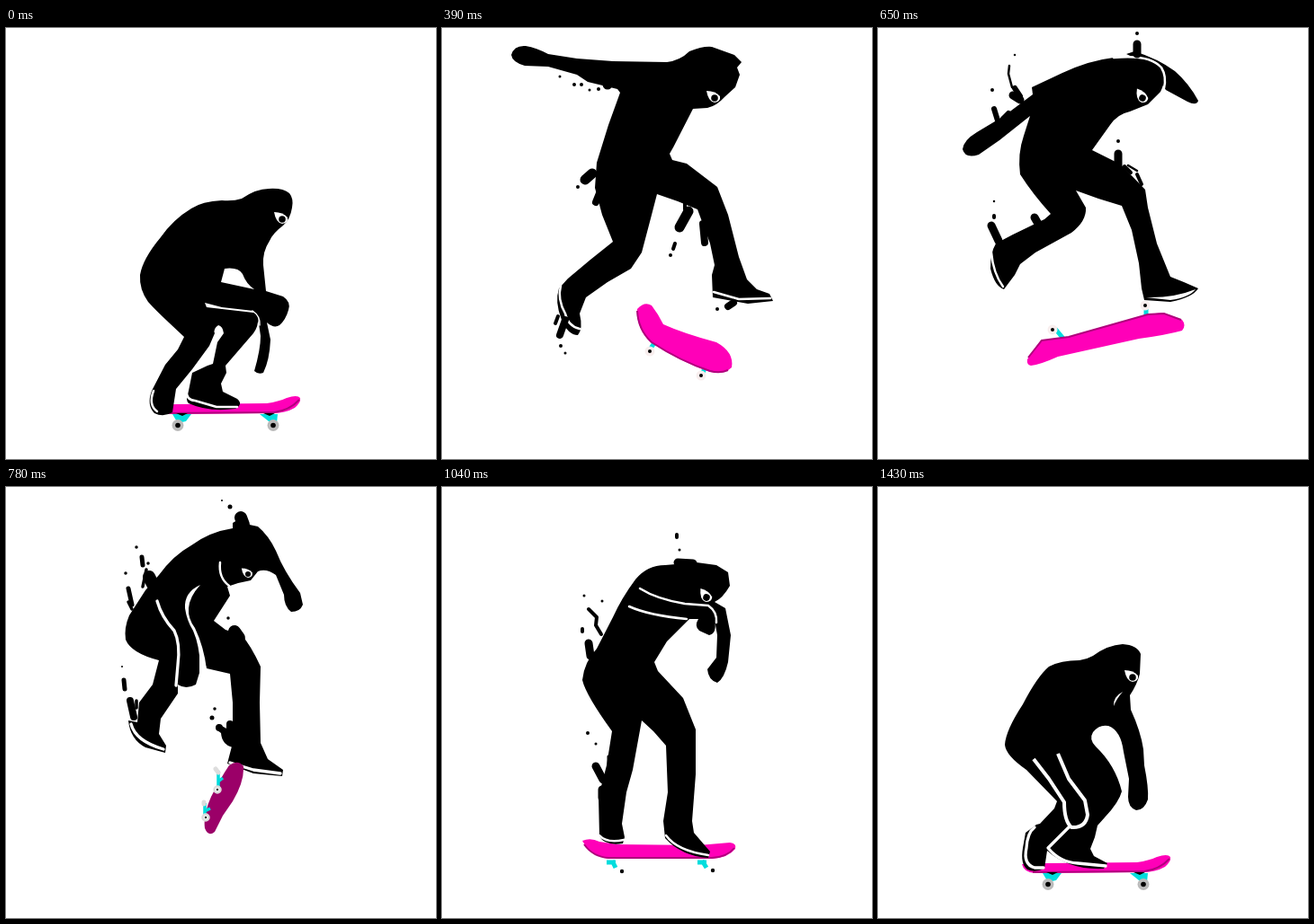
An HTML page for the animation above (1460 ms loop, 478 px wide and 480 px high).

```html
<!DOCTYPE html>
<html lang="en">
<head>
<meta charset="utf-8">
<title>Kickflip</title>
<style>
html,body{margin:0;width:100%;height:100%;overflow:hidden;background:#fff}
svg{display:block;width:100%;height:100%}
.pose{visibility:hidden;animation:hold 1460ms step-end infinite;animation-delay:calc(var(--i)*130ms - 1460ms)}
.last{animation-name:blink}
@keyframes hold{0%{visibility:visible}8.9041%,100%{visibility:hidden}}
@keyframes blink{0%{visibility:visible}2.0548%,100%{visibility:hidden}}
.line,.drop,.truck{fill:none;stroke-linecap:round;stroke-linejoin:round}
.line{stroke:#fff;stroke-width:2.5}
.thin{stroke-width:1.5}
.bold{stroke-width:3.3}
.drop{stroke:#000}
.truck{stroke:#0dd;stroke-width:5;stroke-linecap:butt}
.gap{fill:#fff}
.pink{fill:#ff00b8}
.plum{fill:#9b0068}
.edge{fill:none;stroke:#b0007c;stroke-width:2}
</style>
</head>
<body>
<svg viewBox="0 0 478 480" preserveAspectRatio="none">
<defs>
<g id="eye"><path class="gap" d="M-9-8Q1-8 6-2Q7 4 0 5Q-7 4-9-8"/><circle r="3.8"/></g>
<g id="wheel"><circle r="6.5" fill="#bbb"/><circle r="2.8"/></g>
<g id="pale"><circle r="5.5" fill="#f8eeee"/><circle r="2"/></g>
<g id="rim"><ellipse rx="7" ry="6" fill="#ddd"/><circle cx="2" cy="1" r="1.8"/></g>
<g id="hub"><circle r="3.5" fill="#fff" stroke="#ddd" stroke-width="2.5"/><circle r="1.2"/></g>
<g id="board">
<path class="pink" d="M162 420L190 419L290 418Q303 416 312 412Q324 408 327 412Q328 417 321 423Q311 429 295 429L176 430Q164 429 162 420"/>
<path class="edge" d="M174 429L298 428Q315 426 326 414"/>
<path fill="#0dd" d="M185 430H206L200 438L191 440ZM282 430H302L301 440L292 438Z"/>
<path d="M189 429H202L196 432ZM286 429H299L293 432Z"/>
<use href="#wheel" x="191" y="442.500"/><use href="#wheel" x="297" y="442.500"/>
</g>
</defs>

<g class="pose" style="--i:0">
<use href="#board"/>
<path d="M262 190Q278 179 292 179Q308 178 315 184Q320 190 318 200Q316 213 308 220Q297 228 293 237Q285 249 286 264L289 293L308 299Q317 305 314 314Q311 325 304 331Q298 335 290 328L294 347Q293 370 286 384Q280 386 276 382Q283 358 283 343L280 322Q281 332 275 340L244 376L245 384L239 396L241 405L257 413Q264 419 255 424Q225 428 203 418Q199 414 203 404L207 384L224 376L230 374L235 350L242 340Q241 332 236 331Q230 335 232 340L226 354L207 380L189 402L185 428Q175 434 165 429Q156 420 162 404L177 375L191 358L198 344L181 328Q166 314 158 305Q148 291 149 275Q152 257 172 233Q186 213 206 201Q218 193 240 192Q253 193 262 190Z"/>
<path class="gap" d="M243 268Q258 266 263 274Q267 285 276 291L239 283ZM221 306L240 311L275 315V317L223 311Z"/>
<path class="line thin" d="M274 315Q283 321 282 331"/>
<path class="line" d="M164 404Q158 420 168 427M201 404Q200 414 210 415L234 422L257 422"/>
<use href="#eye" x="307" y="213"/>
</g>

<g class="pose" style="--i:1">
<path class="pink" d="M161 419Q163 413 175 412L210 397L289 347Q302 335 312 338Q316 345 304 356L218 409Q190 424 170 427Q162 426 161 419"/>
<path class="edge" d="M170 426Q196 422 218 408L304 355"/>
<path class="truck" d="M198 418L207 427M282 371L290 380"/>
<use href="#wheel" x="207" y="430"/><use href="#wheel" x="292" y="384"/>
<path d="M256 102Q274 87 293 88Q312 91 316 104L313 124Q303 140 289 151L277 176L267 205L301 230L317 248Q312 283 309 307L327 320L333 329L314 337L286 345L278 337L286 310L283 264L256 256L246 279L236 315L219 348L196 376L190 411Q184 421 174 413Q164 402 172 380L188 348L200 315L187 285Q170 260 177 229L191 183L207 146L173 157L139 180Q122 186 120 174Q123 164 137 158L169 135L208 113Q235 103 256 102Z"/>
<path class="line" d="M171 384Q168 402 181 412M281 339L309 334L331 327"/>
<path class="drop" stroke-width="9" d="M181 228V238M263 258L260 269M170 157v3"/>
<path class="drop" stroke-width="4" d="M179 253h0M258 282h0M154 180h0"/>
<use href="#eye" x="303" y="131"/>
</g>

<g class="pose" style="--i:2">
<path class="plum" d="M248 312Q262 301 272 313L283 330L297 362L309 388Q308 394 300 392L285 386L270 365L250 332Q246 320 248 312"/>
<path fill="none" stroke="#ff00b8" d="M249 312Q246 321 251 332L270 365L285 386L302 392"/>
<path class="truck" d="M246 338L273 357M268 376L295 394M263 350L268 343M285 385L288 374"/>
<use href="#rim" x="245" y="336"/><use href="#rim" x="274" y="358"/><use href="#rim" x="267" y="376"/><use href="#rim" x="295" y="396"/>
<path d="M94 10Q95 5 104 5L116 8L136 19L165 24L212 38Q245 42 272 40L300 25L313 23L335 29L340 38L339 62Q333 70 326 77Q318 85 308 94L294 105L287 115L277 137L273 157L304 177L324 196L329 212L334 270L340 299L346 308L361 316L363 325L325 319L298 309L303 283L306 258L300 217L265 206L254 200L247 222L236 262L226 285L208 302L190 328L184 342Q187 360 181 369Q172 370 163 354Q154 341 156 320L153 309L164 304L190 272L206 256L196 236Q190 220 186 200Q182 180 184 157L195 118L215 71L197 63L175 52L160 51L140 38L136 31L107 22Q95 18 94 10Z"/>
<path class="line" d="M157 322Q158 340 166 352Q172 361 181 364M301 307L325 316L361 321"/>
<path class="drop" stroke-width="10" d="M204 55v5M191 135L183 148M194 225L189 237M270 207L266 222"/>
<path class="drop" stroke-width="6" d="M183 51v4M156 318L149 328M158 338L154 347M321 319v6M279 212v2M289 213v2"/>
<path class="drop" stroke-width="3" d="M140 38h0M151 48h0M164 51h0M178 155h0M178 255h0M261 242h0M149 343L152 348"/>
<path class="drop" stroke-width="6.500" d="M181 249h0M262 235h0"/>
<use href="#eye" transform="translate(324 75)rotate(8)"/>
</g>

<g class="pose" style="--i:3">
<path class="truck" d="M237 349L230 360M293 377L288 388"/>
<use href="#pale" x="231" y="360"/><use href="#pale" x="288" y="387"/>
<path class="pink" d="M217 313Q225 304 233 309Q240 318 246 330Q268 340 305 350Q325 361 322 378Q314 386 298 383Q265 372 232 350Q216 335 217 313"/>
<path class="edge" d="M217 315Q218 336 233 350Q265 371 298 382Q309 385 318 381"/>
<path d="M77 30Q80 19 93 20Q105 22 118 29L150 34L190 37L250 38Q265 36 275 26Q290 20 300 21L325 30L333 38L328 44L331 52L326 66L315 76Q305 87 295 89L279 90L257 133L253 140L256 147L272 151L306 177L318 208L330 255L339 280L350 291L364 296L368 304L340 307L301 300L300 275L303 264L298 240L284 202L262 193L239 185L232 212L222 250L210 268L184 283L160 300L153 318Q157 335 151 342Q140 342 133 325Q125 305 130 290L140 279L165 258L190 238L178 208L170 178L172 150L185 108L198 72L195 68L162 60L150 52L118 43L92 42Q78 38 77 30Z"/>
<path class="line" d="M132 287Q128 302 137 318Q140 332 153 335M302 294L330 302L365 301"/>
<path class="drop" stroke-width="11" d="M184 62v1M167 162L159 169M274 204L264 222"/>
<path class="drop" stroke-width="8" d="M175 184L171 194M290 218L292 239M137 325L131 342M324 306L318 310"/>
<path class="drop" stroke-width="4" d="M147 63h0M155 63h0M174 68h0M151 177h0M259 240L257 246M254 253h0M306 313h0M132 354h0M129 321L126 329M270 195v7"/>
<path class="drop" stroke-width="3" d="M131 54h0M164 69h0M137 362h0"/>
<use href="#eye" x="303" y="78"/>
</g>

<g class="pose" style="--i:4">
<path class="truck" d="M213 346L219 337M287 344L295 336"/>
<path class="pink" d="M182 341Q188 332 202 338L300 337Q322 334 333 345Q337 355 323 361L222 366Q195 363 182 341"/>
<path class="edge" d="M183 341Q190 333 202 339L300 338Q322 335 333 345"/>
<use href="#pale" x="219" y="333"/><use href="#pale" x="296" y="332"/>
<path d="M50 82Q52 71 67 70L104 66L150 55L191 43L241 36Q259 25 281 23L313 29L329 40Q330 59 318 75Q307 88 287 91L270 97L246 139L277 155L302 180L311 216L329 275L346 287L361 295L358 302L332 306L299 302L296 269L283 210L256 193L231 185L230 213Q224 234 203 248L176 264L154 281L151 297L144 313Q130 311 127 288Q123 269 134 257L159 242L191 224L174 194L163 166L169 132L183 89L172 82L139 85L69 95Q52 94 50 82Z"/>
<path class="line" d="M129 265Q128 285 143 306M301 297L330 302L357 298"/>
<path class="drop" stroke-width="9" d="M134 86L130 96M162 160L154 166M269 195L267 208M135 262L126 255"/>
<path class="drop" stroke-width="4" d="M127 107h0M152 72h0M151 179h0M263 223h0M121 241h0M320 311h0"/>
<use href="#eye" transform="translate(299 78)rotate(8)"/>
</g>

<g class="pose" style="--i:5">
<path class="truck" d="M197 335L207 347M298 309V323"/>
<use href="#pale" x="194" y="336"/><use href="#pale" x="297" y="309"/>
<path class="pink" d="M166 369L181 348L212 344L300 319L316 317L338 325Q343 331 338 337Q320 342 290 346L200 366Q180 375 170 376Q165 375 166 369"/>
<path class="edge" d="M167 367L182 348L212 344L300 319L318 318L337 325"/>
<path d="M276 29L285 26Q311 34 330 48Q346 62 356 81Q354 87 344 82L320 69L300 40Z"/>
<path d="M94 135Q95 125 110 116L140 98L172 74L171 66L205 50Q235 36 262 33Q300 30 314 42Q322 55 314 71L300 85L280 93Q266 96 258 108L238 136L270 152L297 180L300 200L310 240L325 277L340 283L356 290Q350 300 325 305L296 303L293 290L290 262L282 225L271 198L245 190L220 181L231 200Q232 215 215 228L175 250L158 263L152 275L140 291Q130 288 125 268Q125 250 131 240L150 230L185 213L192 207Q172 185 158 163Q155 140 162 120L169 98L135 125L112 141Q97 146 94 135Z"/>
<path class="line" d="M262 33Q302 29 315 44Q321 54 318 67"/>
<path class="line" d="M126 250Q128 273 139 288"/>
<path class="gap" d="M298 300Q328 301 353 291Q346 300 325 303Z"/>
<path class="drop" stroke-width="9" d="M288 18V29M126 220L134 237M267 140V153M174 211L178 218M150 75L158 80"/>
<path class="drop" stroke-width="6" d="M129 90L133 103M139 101L145 95M152 67L158 76"/>
<path class="drop" stroke-width="4" d="M288 6h0M127 69h0M129 209v2M267 126h0M274 154L281 161M288 163L293 174"/>
<path class="drop" stroke-width="2.500" d="M152 30h0M146 42L145 51L149 66M129 193h0M278 153L288 159"/>
<use href="#eye" transform="translate(294 78)rotate(18)"/>
</g>

<g class="pose" style="--i:6">
<path d="M252 46L252 40L257 37L266 41L280 44Q292 54 300 71Q309 94 327 118L330 131Q327 139 317 139Q309 133 309 120L300 98Q289 90 280 94L272 104L258 107L246 111L249 121L231 149L244 159L262 165Q272 176 283 200L282 240L283 285L291 303L308 315L307 322L275 319L246 308L252 285L252 240L249 208L223 202L215 177L215 207L211 220Q200 226 191 220L191 230L172 258L170 275L178 288L177 296L155 290Q138 281 136 260L146 262L148 240L163 220L170 193Q139 185 133 170Q131 157 137 143L155 115L170 98Q186 76 206 65Q226 50 252 46Z"/>
<path class="gap" d="M216 109Q198 117 199 135Q201 149 208 160Q215 176 216 200L223 203Q220 178 210 157Q202 146 203 135Q204 122 216 109"/>
<path class="line bold" d="M168 127Q173 145 187 160Q194 174 191 198L189 221"/>
<path class="line" d="M238 84Q236 101 248 110"/>
<path class="line bold" d="M139 264Q144 283 175 292M249 307L275 315L305 319"/>
<path d="M236 264Q232 270 239 274Q240 287 252 290L253 262L246 262L247 270Z"/>
<path class="drop" stroke-width="14" d="M261 34L264 42M159 100L163 108M254 161L259 168"/>
<path class="drop" stroke-width="8" d="M138 238L142 256M237 268h0M249 264V280"/>
<path class="drop" stroke-width="5" d="M249 22h0M151 78L152 87M131 215L132 225M229 257h0M136 113L140 131"/>
<path class="drop" stroke-width="3.500" d="M145 67h0M158 85h0M133 96h0M247 146h0M232 247h0M145 238V246M156 92L152 111M136 128L140 136"/>
<path class="drop" stroke-width="2" d="M240 15h0M129 200h0"/>
<use href="#eye" transform="translate(269 97)scale(.8)"/>
<path class="plum" d="M248 310Q258 303 264 311Q265 328 252 350L241 366L232 384Q225 390 221 380Q219 365 228 345Q238 325 248 310"/>
<path class="truck" style="stroke-width:3.500" d="M236 316V336M221 352V368M236 328L241 324M221 361L227 358"/>
<use href="#hub" x="235" y="337"/><use href="#hub" x="222" y="368"/>
<path class="drop" style="stroke:#ddd" stroke-width="5" d="M233 314L236 318M220 351V353"/>
</g>

<g class="pose" style="--i:7">
<path class="pink" d="M170 349Q176 343 188 350L285 372L311 374Q318 382 306 389Q294 391 275 387L190 369Q174 362 170 349"/>
<path class="edge" d="M171 351Q178 363 190 368L275 386L305 388"/>
<path class="truck" d="M199 370L196 382M280 388L278 398"/>
<use href="#pale" x="198" y="384"/><use href="#pale" x="278" y="401"/>
<path d="M254 66Q272 58 292 65Q307 70 310 82Q310 99 294 109L302 119L319 144L322 167Q321 181 310 182Q301 177 303 165L298 144L280 126L260 137L248 155L235 174L262 196L282 225L283 264L277 325L282 344L302 358L300 366L272 365L249 351L252 326L250 256L226 234L212 267L194 303L187 331L197 349L193 355Q177 354 171 335L176 311L179 269L184 241Q158 225 149 202Q149 181 166 157L181 127Q198 94 216 78Q234 66 254 66Z"/>
<path class="line" d="M186 131Q209 141 209 163L204 190M216 108Q234 120 227 146M173 336Q177 350 193 352M250 349L273 361L300 363"/>
<path class="drop" stroke-width="10" d="M157 169L162 184M265 61v4M179 267L175 281"/>
<path class="drop" stroke-width="4" d="M253 43h0M153 150L157 157M150 122h0M156 227h0M158 244L161 252M241 313h0"/>
<use href="#eye" transform="translate(287 100)scale(.9)"/>
</g>

<g class="pose" style="--i:8">
<path class="pink" d="M156 394Q165 390 175 395L195 398L285 399L320 396Q328 397 326 403Q318 413 300 414L185 414Q165 410 156 394"/>
<path class="edge" d="M158 398Q168 412 185 413H300Q317 412 325 402"/>
<path class="truck" d="M183 418H193M189 416L193 424M284 418H294M289 416L294 424"/>
<circle cx="200" cy="428" r="2.200"/><circle cx="301" cy="427" r="2.200"/>
<path d="M248 87L283 84L305 87L318 95L320 110Q312 124 303 128L315 135L321 165L318 195Q314 213 306 218Q296 215 295 203L305 190L306 165L303 148Q306 163 297 165L286 160Q280 155 285 147L275 147L250 172L236 195L240 205L268 235L282 270L282 320L278 372L280 385L298 406L296 413Q266 411 248 391L246 372L251 340L249 288L235 272L222 260L212 315L205 340L200 375L203 390L201 397Q181 400 175 389L174 345L183 310L189 272Q160 232 156 215Q158 195 172 180L190 145Q200 123 215 103Q228 87 248 87Z"/>
<path class="line" d="M220 113Q239 125 270 130L296 132Q306 139 305 151M208 133Q230 143 272 147M175 388Q183 397 202 393M249 388Q261 405 296 410"/>
<path class="drop" stroke-width="9" d="M163 174L165 188M262 84L279 85M171 311L179 326M178 337V346"/>
<path class="drop" stroke-width="4" d="M261 53V56M156 158V161M163 136L172 145L171 154L177 164M162 274h0"/>
<path class="drop" stroke-width="3" d="M158 121h0M178 127h0M171 286h0M264 70h0M185 300V310"/>
<use href="#eye" transform="translate(294 123)rotate(15)"/>
</g>

<g class="pose" style="--i:9">
<use href="#board"/>
<path d="M249 107Q266 99 287 101Q306 104 313 116Q315 130 303 140L296 148L307 166L313 193L311 217Q308 237 298 238Q288 235 289 220L292 195L281 171L261 180L243 209L259 230L275 264L277 293L266 344L264 379L272 397L288 410L286 420Q257 421 231 408L238 380L241 337L239 295L219 288L207 322L193 359L188 384L194 411L188 421Q169 421 164 411L169 378L178 340L183 292Q157 261 151 242Q149 221 167 194Q185 152 209 121Q226 105 249 107Z"/>
<path class="line" d="M203 160Q224 183 256 182L283 177M218 142Q245 160 277 163M165 407Q171 418 190 418M233 406Q253 419 286 418"/>
<path class="drop" stroke-width="7" d="M157 205L160 216M262 99L273 101M169 348L175 359"/>
<path class="drop" stroke-width="3" d="M153 189h0M265 82h0M162 333h0"/>
<use href="#eye" transform="translate(293 134)rotate(8)"/>
</g>

<g class="pose" style="--i:10">
<use href="#board"/>
<path d="M243 135Q260 122 279 122Q299 123 305 135L303 156Q300 170 290 181L291 196L301 229L305 256L306 284Q304 304 296 306Q285 304 285 289L281 250L270 231Q257 222 244 233L244 250L262 274L275 303L262 339L249 363L246 388L251 404L268 416L263 424Q231 426 204 412L216 386L223 353L217 318L206 342L190 371L188 399L190 422Q176 430 164 421L166 390L178 358L191 329L176 311Q151 289 146 269Q147 250 163 223Q179 183 200 151Q217 137 243 135Z"/>
<path class="line bold" d="M178 264Q193 286 201 308Q206 326 216 326Q228 320 224 304L212 274L205 252"/>
<path class="line" d="M167 393Q162 415 170 423M207 409Q232 423 263 421M281 176Q274 181 272 188"/>
<use href="#eye" x="293" y="158"/>
</g>

<g class="pose last" style="--i:11">
<use href="#board" x="-2"/>
<path d="M239 188Q255 176 272 175Q288 176 292 186L291 208Q288 220 280 232L281 248Q292 272 295 292L296 310Q301 335 300 348Q296 360 287 360Q278 357 278 345L279 325L273 295Q270 271 256 266Q246 264 239 273Q234 281 242 289Q264 310 271 339Q268 351 252 368L244 377L241 390L236 403L240 411L255 419L251 425Q213 427 188 405L185 425Q174 430 166 426Q158 420 161 402L164 385L176 376L180 375L196 358L199 350L165 315Q142 299 141 287Q142 271 161 242Q177 211 190 200Q203 193 224 193Q232 192 239 188Z"/>
<path class="line" style="stroke-width:4;stroke-linecap:butt" d="M173 303L190 325L207 351Q207 372 215 379Q231 380 233 365L230 349L212 325L200 297"/>
<path class="line bold" d="M174 379Q166 385 165 402Q161 420 174 424L184 424M212 379L189 402Q202 418 222 419L253 422"/>
<path class="gap" d="M272 228Q261 234 262 244Q265 236 272 228"/>
<use href="#eye" x="283" y="212"/>
</g>
</svg>
</body>
</html>
```
